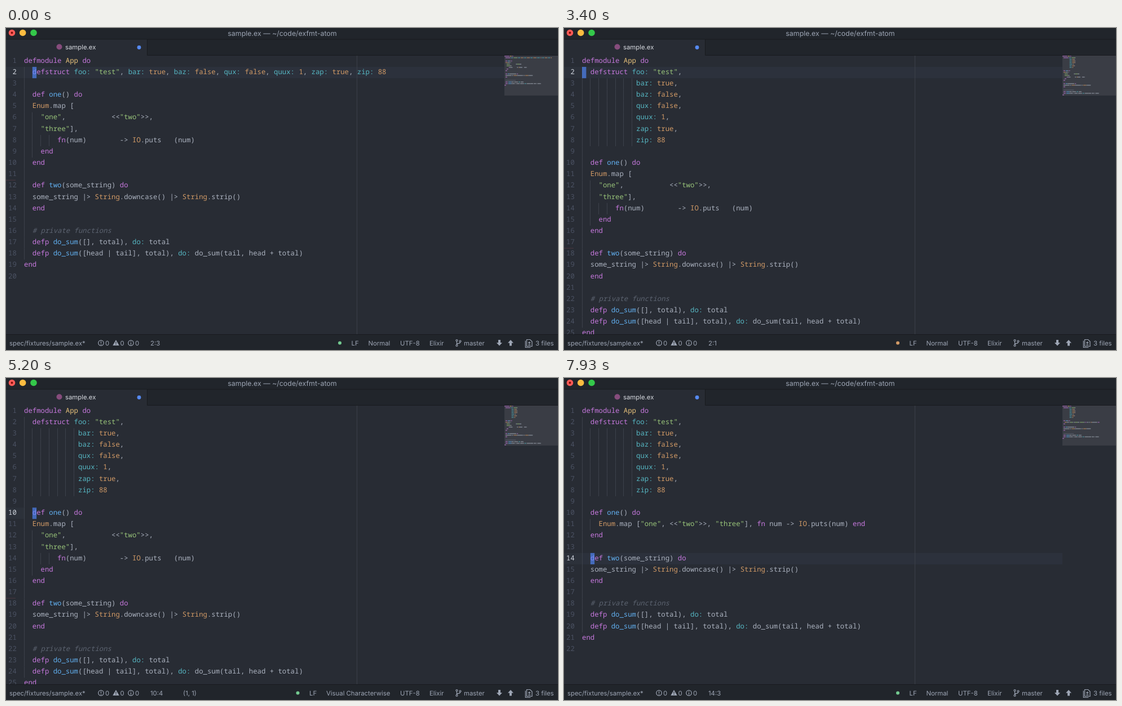
Recreate the animation shown at these times as an HTML page. Size 979x572 px, loop 8000 ms.

```html
<!DOCTYPE html>
<html lang="en">
<head>
<meta charset="utf-8">
<title>Editor</title>
<style>
  html, body { margin: 0; width: 100%; height: 100%; overflow: hidden; background: #282c34; }
  svg { display: block; width: 100%; height: 100%; }
  text { font: 11.35px Inter, "Open Sans", sans-serif; fill: #9da5b4; text-rendering: geometricPrecision; white-space: pre; }
  .code text { font: 12.308px "Noto Sans Mono", "DejaVu Sans Mono", monospace; fill: #abb2bf; }
  .code .number { fill: #4b5263; text-anchor: end; }
  .code .current { fill: #d0d5de; }
  .icon { fill: none; stroke: #9da5b4; stroke-width: 1.2; }
  .solid { fill: #9da5b4; }
</style>
</head>
<body>
<svg viewBox="0 0 979 572">
  <rect width="979" height="572" fill="#282c34"/>
  <g id="editor" class="code"></g>

  <rect width="979" height="20" fill="#21252b"/>
  <rect x="251" y="20" width="728" height="28" fill="#21252b"/>
  <path d="M0 20H979M250.5 20V48.5H979" fill="none" stroke="#181a1f"/>
  <circle cx="10.5" cy="8.5" r="5.8" fill="#fc5b57"/>
  <circle cx="10.5" cy="8.5" r="1.9" fill="#7e0e09"/>
  <circle cx="29.7" cy="8.5" r="5.8" fill="#fdbc40"/>
  <circle cx="49" cy="8.5" r="5.8" fill="#34c84a"/>
  <text x="490" y="13.5" text-anchor="middle" style="font-size:12.4px">sample.ex — ~/code/exfmt-atom</text>
  <circle cx="94.5" cy="33.5" r="5" fill="#864c7c"/>
  <text x="105" y="38.3" style="fill:#d7dae0">sample.ex</text>
  <circle cx="236" cy="34.5" r="3.4" fill="#568af2"/>

  <rect y="544" width="979" height="28" fill="#21252b"/>
  <path d="M0 544.5H979" stroke="#181a1f"/>
  <text x="6" y="563.5">spec/fixtures/sample.ex*</text>
  <circle class="icon" cx="168.5" cy="559.5" r="4.7"/>
  <path class="icon" d="M168.5 556.5v3.4m0 1.1v1.4"/>
  <path class="solid" d="M195 554l5.7 10h-11.4z"/>
  <path d="M195 557.5v3m0 1v1.3" stroke="#21252b" stroke-width="1.2"/>
  <circle class="icon" cx="221.5" cy="559.5" r="4.7"/>
  <path class="icon" d="M221.5 556.7v1.3m0 1v3.4"/>
  <text x="176" y="563.5">0</text><text x="202.5" y="563.5">0</text><text x="229" y="563.5">0</text>
  <text x="699" y="563.5">UTF-8</text>
  <text x="751" y="563.5">Elixir</text>
  <g class="icon">
    <circle cx="799.5" cy="555" r="1.5"/><circle cx="799.5" cy="564" r="1.5"/><circle cx="805.5" cy="556.5" r="1.5"/>
    <path d="M799.5 556.5v6q0-2 3-2.2t3-2.3"/>
  </g>
  <text x="812" y="563.5">master</text>
  <path class="solid" d="M873 554h4v5h3l-5 5.5-5-5.5h3zM893 564.5h4v-5h3l-5-5.5-5 5.5h3z"/>
  <path class="icon" d="M923.5 553.5h6l3.5 3.5v8.5h-9.5zM921.3 555.5v12h9M926 559.2h4.4m-2.2-2.2v4.4m-2.2 1.8h4.4"/>
  <text x="939" y="563.5">3 files</text>
  <g id="status"></g>
</svg>

<script>
const LEFT = 32, TOP = 48.9, CHAR = 7.385, LINE = 20.15, RIGHT = 884;
const MAP_CHAR = 0.965, MAP_LINE = 2.87;

const lines = text => text.split('\n');
const structFlat = ['  defstruct foo: "test", bar: true, baz: false, qux: false, quux: 1, zap: true, zip: 88'];
const structTall = lines(`  defstruct foo: "test",
             bar: true,
             baz: false,
             qux: false,
             quux: 1,
             zap: true,
             zip: 88`);
const oneMessy = lines(`  def one() do
  Enum.map [
    "one",           <<"two">>,
    "three"],
        fn(num)        -> IO.puts   (num)
    end
  end`);
const oneTidy = lines(`  def one() do
    Enum.map ["one", <<"two">>, "three"], fn num -> IO.puts(num) end
  end`);
const tail = lines(`
  def two(some_string) do
  some_string |> String.downcase() |> String.strip()
  end

  # private functions
  defp do_sum([], total), do: total
  defp do_sum([head | tail], total), do: do_sum(tail, head + total)
end
`);
const compose = (struct, one) => ['defmodule App do', ...struct, '', ...one, ...tail];
const docs = [compose(structFlat, oneMessy), compose(structTall, oneMessy), compose(structTall, oneTidy)];

// One capture group per colour, in the order of the palette.
const syntax = /(#.*)|("[^"]*")|((?<=defmodule )\w+)|((?<=defp? )\w+)|(\b(?:defmodule|defstruct|defp|def|do(?!:)|end|fn)\b)|(\w+:)|(\b[A-Z]\w*|\b(?:true|false|\d+)\b)|(\w+|[^\w\s"]+)/g;
const palette = ['#5c6370', '#98c379', '#e5c07b', '#61afef', '#c678dd', '#56b6c2', '#d19a66', '#abb2bf'];
const tokenize = line => [...line.matchAll(syntax)].map(m => ({
  text: m[0], col: m.index, color: palette[m.slice(1).findIndex(group => group !== undefined)]
}));

const modes = [
  { name: 'Normal', x: 642.5 },
  { name: 'Visual Linewise', x: 599 },
  { name: 'Visual Characterwise', x: 568 }
];

// Each step inherits whatever it does not change.
const steps = [{ at: 0, doc: 0, row: 2, col: 2, mode: 0, from: 0, busy: false, info: '', infoX: 0 }];
const step = (at, change) => steps.push({ ...steps.at(-1), at, ...change });
const moveDown = (at, row, count, gap) => {
  for (let i = 1; i <= count; i++) step(at + i * gap, { row: row + i });
};
step(400, { mode: 1, from: 2, info: '(1, 88)', infoX: 306 });
step(1330, { col: 87 });
step(2530, { doc: 1, col: 0, mode: 0, info: '', busy: true });
step(3560, { busy: false });
moveDown(3600, 2, 8, 130);
step(4770, { col: 2 });
step(4930, { mode: 2, from: 10, info: '(1, 1)', infoX: 314 });
step(6200, { mode: 1, row: 16, col: 5, info: '(7, 130)', infoX: 311 });
step(6600, { doc: 2, mode: 0, row: 10, col: 0, info: '', busy: true });
moveDown(7000, 10, 4, 130);
step(7630, { busy: false });
step(7700, { col: 2 });

const escape = s => s.replace(/&/g, '&amp;').replace(/</g, '&lt;');
const rect = (x, y, w, h, fill, more = '') =>
  `<rect x="${x}" y="${y}" width="${w}" height="${h}" fill="${fill}" ${more}/>`;
const label = (x, s) => `<text x="${x}" y="563.5">${s}</text>`;
const lineTop = row => TOP + (row - 1) * LINE;
const colX = col => LEFT + col * CHAR;

function drawLine(line, row, active, isLast) {
  const y = lineTop(row), base = y + 12.8;
  const indent = line ? line.search(/\S/) : isLast ? 0 : 2;
  let out = '';
  for (let col = 0; col < indent; col += 2)
    out += rect(Math.floor(colX(col)), y, 1, LINE, '#3c414b');
  out += `<text class="number ${active ? 'current' : ''}" x="18.8" y="${base}">${row}</text>`;
  const spans = tokenize(line).map(({ text, col, color }) => {
    const slant = text[0] === '#' ? ';font-style:italic' : '';
    return `<tspan x="${colX(col)}" style="fill:${color}${slant}">${escape(text)}</tspan>`;
  });
  return out + `<text y="${base}">${spans.join('')}</text>`;
}

function drawMinimap(doc) {
  let out = rect(RIGHT, 48, 95, 72, '#3a3d45');
  doc.forEach((line, i) => tokenize(line).forEach(({ text, col, color }) => {
    out += rect(RIGHT + col * MAP_CHAR, 49.2 + i * MAP_LINE, text.length * MAP_CHAR, 1.5, color, 'opacity=".6"');
  }));
  return out;
}

function drawEditor(s) {
  const doc = docs[s.doc];
  const first = s.mode ? s.from : s.row;
  const y = lineTop(first), height = (s.row - first + 1) * LINE;
  let out = rect(0, y, LEFT, height, '#2c313a');
  if (s.mode < 2) out += rect(LEFT, y, RIGHT - LEFT, height, s.mode ? '#3e4451' : '#2c313c');
  out += rect(622, 48, 1, 496, '#3b3f48');
  if (s.doc < 2) out += rect(0, lineTop(doc.indexOf('  def two(some_string) do') + 1) - 0.8, 17, 1, '#e06c75', 'opacity=".2"');
  doc.forEach((line, i) => {
    out += drawLine(line, i + 1, i + 1 >= first && i + 1 <= s.row, i === doc.length - 1);
  });
  out += rect(colX(s.col), lineTop(s.row), CHAR, LINE, '#528bff', 'opacity=".65"');
  return out + drawMinimap(doc);
}

function drawStatus(s) {
  const { name, x } = modes[s.mode];
  const position = s.mode === 1 ? `${s.row + 1}:1` : `${s.row}:${s.col + (s.mode ? 2 : 1)}`;
  return label(256, position) + label(s.infoX, s.info) + label(x - 30, 'LF') + label(x, name) +
    `<circle cx="${x - 50.5}" cy="559.5" r="3" fill="${s.busy ? '#d19a66' : '#73c990'}"/>`;
}

const editor = document.getElementById('editor');
const status = document.getElementById('status');
let shown;
function frame() {
  const time = performance.now() % 8000;
  const current = steps.findLast(s => s.at <= time);
  if (current !== shown) {
    shown = current;
    editor.innerHTML = drawEditor(current);
    document.getElementById('status').innerHTML = drawStatus(current);
  }
  requestAnimationFrame(frame);
}
frame();
</script>
</body>
</html>
```
